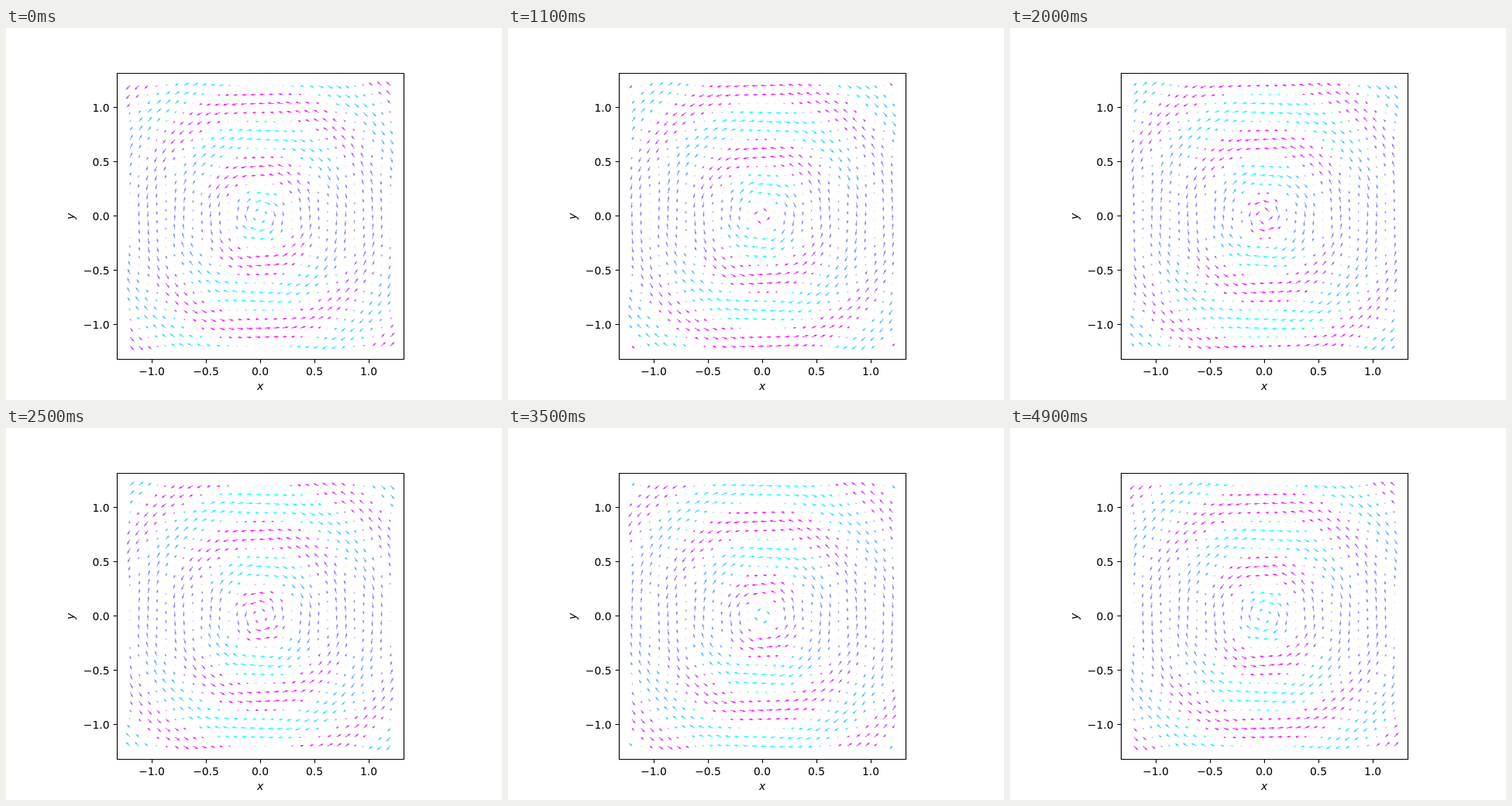
Animation, 640 px wide and 480 px high, one loop 5000 ms. Source, as an HTML page with a canvas:

```html
<!DOCTYPE html>
<html lang="en">
<head>
<meta charset="utf-8">
<title>Rotating wave field</title>
<style>
  html, body { margin: 0; width: 640px; height: 480px; overflow: hidden; background: #fff; }
  canvas, svg { position: absolute; left: 0; top: 0; display: block; }
  text { font: 13.89px "DejaVu Sans", Verdana, sans-serif; fill: #000; text-anchor: middle; }
  .end { text-anchor: end; }
  .name { font-style: italic; }
  path { fill: none; stroke: #000; stroke-width: 1.11; }
</style>
</head>
<body>
<canvas id="field" width="640" height="480"></canvas>
<svg id="axes" width="640" height="480" viewBox="0 0 640 480">
  <path d="M143.5 58.5H513.5V427.5H143.5Z"/>
  <text class="name" x="328" y="467">x</text>
  <text class="name" transform="translate(88.4 243) rotate(-90)">y</text>
</svg>
<script>
const CX = 328, CY = 242.4, UNIT = 140;
const COUNT = 30, LIMIT = 1.2;
const WAVE = 0.603;        // wavelength in axis units
const STEP = 100, STEPS = 50;
const SHAFT = 0.887;       // shaft width in pixels
const REACH = 8.4;         // longest arrow in pixels
const ctx = document.getElementById('field').getContext('2d');

function addAxes() {
  const svg = document.getElementById('axes');
  const add = (tag, attrs, label = '') => {
    const node = document.createElementNS('http://www.w3.org/2000/svg', tag);
    for (const key in attrs) node.setAttribute(key, attrs[key]);
    node.textContent = label;
    svg.append(node);
  };
  for (let i = -2; i <= 2; i++) {
    const value = i / 2;
    const label = (value < 0 ? '\u2212' : '') + Math.abs(value).toFixed(1);
    const x = CX + value * UNIT, y = CY - value * UNIT;
    add('path', { d: `M${x + 0.5} 427.5v4.9` });
    add('path', { d: `M143.5 ${y + 0.1}h-4.9` });
    add('text', { x, y: 447.6 }, label);
    add('text', { x: 133.5, y: y + 5.2, class: 'end' }, label);
  }
}

const points = [];
for (let row = 0; row < COUNT; row++) {
  for (let col = 0; col < COUNT; col++) {
    const x = LIMIT * (2 * col / (COUNT - 1) - 1);
    const y = LIMIT * (2 * row / (COUNT - 1) - 1);
    const r = Math.hypot(x, y);
    points.push({ px: CX + x * UNIT, py: CY - y * UNIT, r, dx: y / r, dy: x / r });
  }
}

// Sizes are in shaft widths; short arrows shrink as a whole.
function arrow(p, length, sign) {
  const size = Math.abs(length) / SHAFT;
  const scale = SHAFT * Math.min(1, size / 5);
  const tip = Math.max(size, 5);
  const ux = p.dx * sign, uy = p.dy * sign;
  ctx.beginPath();
  if (size < 1) {
    for (let k = 0; k < 6; k++) {
      const a = k * Math.PI / 3;
      ctx.lineTo(p.px + SHAFT / 2 * Math.cos(a), p.py + SHAFT / 2 * Math.sin(a));
    }
  } else {
    const to = (a, b) => ctx.lineTo(
      p.px + scale * (a * ux - b * uy),
      p.py + scale * (a * uy + b * ux));
    to(0, 0.5);
    to(tip - 4.5, 0.5);
    to(tip - 5, 1.5);
    to(tip, 0);
    to(tip - 5, -1.5);
    to(tip - 4.5, -0.5);
    to(0, -0.5);
  }
  ctx.fill();
}

function draw(step) {
  ctx.clearRect(0, 0, 640, 480);
  const turn = step / (STEPS - 1);
  for (const p of points) {
    const s = Math.sin(2 * Math.PI * (p.r / WAVE - turn));
    const tint = Math.max(-1, Math.min(1, 4 * s)) * p.dx * p.dx;
    const c = Math.round(127.5 * (1 - tint));
    ctx.fillStyle = `rgb(${c},${255 - c},255)`;
    arrow(p, REACH * Math.abs(s) ** 0.75, Math.sign(s) || 1);
  }
}

addAxes();
draw(0);
const start = performance.now();
let last = 0;
function tick() {
  const step = Math.floor((performance.now() - start) / STEP) % STEPS;
  if (step !== last) draw(last = step);
  requestAnimationFrame(tick);
}
requestAnimationFrame(tick);
</script>
</body>
</html>
```
